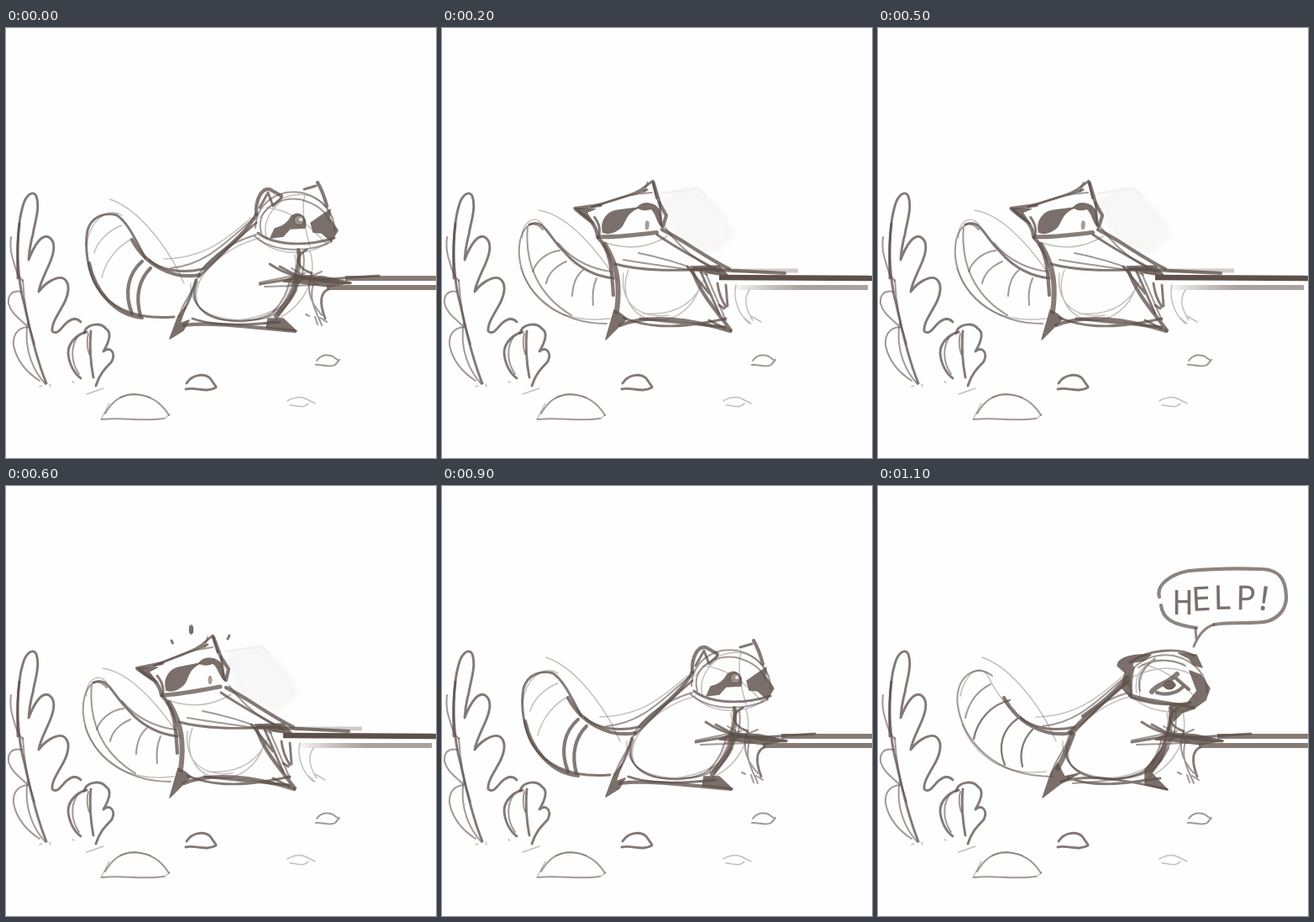
An HTML page for the animation above (2100 ms loop, 512 px wide and 512 px high).

```html
<!DOCTYPE html>
<html lang="en">
<head>
<meta charset="utf-8">
<title>Raccoon tug</title>
<style>
  html, body { margin: 0; width: 100%; height: 100%; overflow: hidden; background: #fefefe; }
  svg { display: block; width: 100vw; height: 100vh; filter: blur(.5px); }
  path, ellipse { fill: none; stroke: #5d504a; stroke-linecap: round; stroke-linejoin: round; }
  .faint { stroke-width: 1.5; opacity: .36; }
  .thin { stroke-width: 2; opacity: .58; }
  .line { stroke-width: 2.9; opacity: .76; }
  .bold { stroke-width: 4.2; opacity: .76; }
  .heavy { stroke-width: 6; opacity: .74; }
  .ink { fill: #5d504a; stroke-width: 1.5; opacity: .82; }
  .rope { stroke: #877b75; stroke-width: 6; stroke-linecap: butt; }
  .ghost { fill: #f9f8f8; stroke: #f2f1f0; stroke-width: 3; }
  text { font: 40px "Noto Sans Mono", monospace; fill: #70645f; }
  .pose { display: none; }
</style>
</head>
<body>
<svg viewBox="0 0 512 512">
  <defs>
    <linearGradient id="fade" gradientUnits="userSpaceOnUse" x1="345" x2="430">
      <stop stop-color="#877b75" stop-opacity="0"/><stop offset="1" stop-color="#a9a19d"/>
    </linearGradient>
    <filter id="soft"><feGaussianBlur stdDeviation="3"/></filter>

    <!-- Parts shared by the two forward-leaning poses -->
    <g id="lean">
      <path class="rope" d="M404 298H512M382 309H512"/>
      <path class="faint" d="M124 204C160 216 196 266 212 304"/>
      <path class="faint" d="M188 275C238 274 264 250 292 226"/>
      <path class="thin" d="M196 286C240 282 264 252 296 226"/>
      <path class="bold" d="M150 252C166 282 198 300 230 294"/>
      <path class="line" d="M170 276C184 288 208 293 234 287"/>
      <path class="line" d="M230 296C254 272 276 250 298 232"/>
      <path class="thin" d="M230 292C222 318 210 326 206 344M298 246C258 258 220 288 224 320C230 350 282 356 312 342C346 324 352 296 350 266"/>
      <path class="thin" d="M228 302C214 338 250 352 292 348C318 346 336 334 346 312"/>
      <path class="faint" d="M302 250C256 262 214 302 230 332C246 358 300 348 322 334M220 304C218 340 256 352 304 346"/>
      <path class="faint" d="M362 266C374 304 346 344 306 352M344 270Q350 300 322 340"/>
      <path class="thin" d="M354 268Q360 300 324 342M338 300Q334 322 318 338"/>
      <path class="line" d="M302 305L350 297L386 300M314 281C330 292 354 302 410 304"/>
      <path class="ink" d="M330 302L346 294L378 296L411 303L384 308L352 304Z"/>
      <path class="line" d="M326 284L352 298L396 300M384 299L444 295"/>
      <path class="thin" d="M302 303L356 292M308 308L368 306M334 308L376 290M340 286L372 306"/>
      <path class="line" d="M358 264C342 272 346 286 364 292"/>
      <path class="bold" d="M348 264Q350 280 344 296"/>
      <path class="thin" d="M364 292C356 314 364 328 376 342M366 304C360 326 370 338 376 354"/>
      <path class="line" d="M384 311C372 316 374 330 380 346"/>
      <path class="thin" d="M368 344l3 9M374 345l8 5M357 341l4 2"/>
    </g>
  </defs>

  <g id="scenery">
    <path class="line" d="M16 233C12 262 14 302 22 330C28 358 36 394 48 423"/>
    <path class="line" d="M14 298C13 268 14 232 20 212C24 198 32 193 36 200C41 214 34 232 32 246Q28 260 27 276C33 260 42 245 51 249C59 254 58 266 52 280C46 294 40 305 39 314C46 304 60 295 68 298C77 303 75 316 69 328C61 343 54 352 55 361C61 366 65 358 71 352Q82 342 89 350"/>
    <path class="thin" d="M6 249Q4 264 9 278Q13 295 20 301M18 314C7 312 2 318 3 328C6 340 15 345 24 354M26 356C13 357 8 366 9 378C13 397 26 411 40 420"/>
    <path class="thin" d="M26 350C20 384 34 410 47 424M20 300Q22 340 34 376"/>
    <path class="line" d="M101 361C99 381 101 400 104 416"/>
    <path class="line" d="M96 362C86 364 74 374 74 387C75 401 82 412 89 417"/>
    <path class="line" d="M93 363C96 352 112 350 119 358C127 363 122 375 116 385C124 379 131 386 126 397C120 404 112 410 107 426"/>
    <path class="thin" d="M85 368C77 380 77 398 87 412M98 364Q95 376 99 388"/>
    <path class="faint" d="M96 436L116 429M79 421l2 1M40 427l3-1M52 424l1 3"/>
    <path class="thin" d="M118 459C126 445 137 436 153 436C171 437 185 446 194 461M114 466C140 463 160 469 188 465"/>
    <path class="faint" d="M113 466L123 447M189 465L195 460M136 440Q153 433 172 440"/>
    <path class="line" d="M215 423C222 412 236 411 243 417L250 427M214 430C226 427 238 435 250 428"/>
    <path class="thin" d="M370 396C375 389 383 388 389 391L396 396M369 401C376 400 386 405 392 401L397 395"/>
    <path class="faint" d="M335 444C342 440 350 439 356 441L368 447M338 449C346 449 354 454 360 447"/>
  </g>

  <g id="cling" class="pose">
    <use href="#lean"/>
    <path class="line" d="M166 274C156 256 146 232 132 223C118 219 102 224 97 241C93 262 98 292 108 308C122 330 148 348 200 344"/>
    <path class="bold" d="M99 280C106 314 130 342 162 345"/>
    <path class="faint" d="M96 260C98 231 120 212 138 223"/>
    <path class="faint" d="M138 235C121 241 108 256 105 268M148 252C130 262 118 280 114 297"/>
    <path class="bold" d="M162 278C146 292 140 314 150 340M172 286C158 300 154 320 160 342"/>
    <path class="bold" d="M298 222C286 244 262 262 236 286"/>
    <path class="ink" d="M214 332L205 343L195 370L211 360L218 348L207 352Z"/>
    <path class="line" d="M226 300Q220 322 212 336"/>
    <path class="bold" d="M212 354C244 350 290 356 344 361"/>
    <path class="line" d="M222 346C250 356 290 354 326 350"/>
    <path class="heavy" d="M346 300C342 318 332 330 322 343"/>
    <path class="ink" d="M312 346L330 346L346 361L310 357Z"/>
    <path class="thin" d="M297 238C298 210 322 191 352 196C378 202 392 222 391 242M304 244C296 216 326 200 350 204Q380 212 386 232"/>
    <path class="faint" d="M302 226C330 188 374 190 388 226M310 214Q346 216 382 258M302 252C322 272 364 272 384 254M328 206Q304 226 310 250M356 198Q350 220 362 260"/>
    <path class="line" d="M300 244C320 260 360 260 391 250"/>
    <path class="thin" d="M296 248C318 268 362 268 388 254"/>
    <path class="bold" d="M298 222C297 203 305 190 314 192L328 200"/>
    <path class="line" d="M302 214L312 196L318 212L328 202"/>
    <path class="bold" d="M371 184Q378 196 382 212"/>
    <path class="line" d="M355 192L369 188"/>
    <path class="ink" d="M315 250L320 239Q334 236 340 224C350 217 359 226 356 238L338 239L330 248Z"/>
    <path class="ink" d="M363 232L373 225L386 216L385 226L395 241L387 254L376 244L366 243Z"/>
    <ellipse cx="349" cy="229" rx="6" ry="6" style="fill:#9b918c"/>
    <ellipse cx="351" cy="228" rx="2" ry="2" style="fill:#eee;stroke:none"/>
  </g>

  <g id="slip" class="pose">
    <path class="rope" d="M374 297H507M370 308H507"/>
    <path class="faint" d="M119 236C102 222 84 246 94 282C104 326 150 350 208 347M92 260C96 240 112 224 124 234M118 214C150 224 182 262 214 312"/>
    <path class="thin" d="M95 284C104 320 140 346 198 346"/>
    <path class="line" d="M130 245C158 286 190 304 222 296"/>
    <path class="thin" d="M124 241C150 254 162 282 190 290M165 293C190 291 202 306 224 300"/>
    <path class="thin" d="M182 279C222 278 242 252 262 226"/>
    <path class="faint" d="M170 276C216 282 240 266 264 240"/>
    <path class="line" d="M270 214C252 244 226 264 220 296"/>
    <path class="thin" d="M262 238C240 266 222 298 212 330M258 236C234 258 214 290 212 318M268 226C244 250 224 274 222 304"/>
    <path class="thin" d="M260 252C228 272 210 316 230 336C250 358 290 348 306 334C326 310 318 280 316 262"/>
    <path class="thin" d="M222 312C224 346 264 352 296 340"/>
    <path class="faint" d="M264 258C224 280 212 324 242 344C278 356 314 332 318 290"/>
    <path class="line" d="M217 306L206 342L197 370L214 354L230 344"/>
    <path class="bold" d="M214 338L199 366"/>
    <path class="thin" d="M207 344L224 350M204 362L226 346"/>
    <path class="line" d="M218 352C252 350 290 344 318 338M222 346C260 364 300 350 316 344"/>
    <path class="thin" d="M236 355C272 360 304 356 340 361L314 341M320 340L340 358"/>
    <path class="bold" d="M328 290C328 310 324 330 314 342"/>
    <path class="thin" d="M336 296Q332 324 308 342M318 266Q322 300 316 338M322 290Q328 318 314 344"/>
    <path class="thin" d="M286 302L316 296L396 303M298 278C320 294 350 300 396 304M308 285L354 294L440 294"/>
    <path class="ink" d="M328 295L354 293L398 303L368 307L344 300Z"/>
    <path class="thin" d="M306 282L346 304M294 304L350 300M322 304L362 290"/>
    <path class="line" d="M318 262C316 280 322 290 326 300"/>
    <path class="thin" d="M342 258C325 272 328 288 346 294M336 260Q320 276 338 292M344 304C348 325 356 334 368 350"/>
    <path class="line" d="M370 310C358 318 360 330 368 347"/>
    <path class="thin" d="M356 341l6 12M366 342l11 7M347 342l5 3"/>
    <path class="thin" d="M265 238C260 210 282 194 308 194C336 194 352 218 354 240M268 244C262 216 286 200 312 200Q338 204 348 226"/>
    <path class="faint" d="M274 214C300 184 338 196 348 226M270 246C300 270 338 270 354 256M296 198Q272 222 282 252M318 200Q306 228 326 264M278 200Q312 214 336 248"/>
    <path class="thin" d="M284 204Q270 226 280 246M276 212L300 226M268 238Q286 228 304 232"/>
    <path class="line" d="M257 248C280 236 312 256 354 254"/>
    <path class="thin" d="M264 248C290 270 326 268 354 260M286 234Q312 216 342 230M292 246L326 238L352 250"/>
    <path class="bold" d="M338 222C350 228 362 238 363 246C361 256 348 258 334 254"/>
    <path class="line" d="M264 222C258 206 264 196 271 197C280 200 274 214 267 224M266 206L278 198"/>
    <path class="thin" d="M314 193L330 189L345 209"/>
    <path class="ink" d="M300 236C300 224 310 219 318 225C326 232 319 240 310 240Z"/>
    <path class="ink" d="M334 224L344 220L356 236L350 242L338 236Z"/>
    <path class="heavy" d="M294 242L308 238"/>
    <ellipse cx="314" cy="229" rx="3" ry="3" style="fill:#aaa19d;stroke:none"/>
  </g>

  <g id="pull" class="pose">
    <path class="ghost" d="M264 206L300 192L332 220L346 246L326 264L286 254Z" filter="url(#soft)"/>
    <path class="ghost" style="fill:none" d="M262 197L304 191L314 200"/>
    <path d="M345 308.9L507 309" style="stroke:url(#fade);stroke-width:6;stroke-linecap:butt"/>
    <path d="M344 289H424" style="stroke:#d0cbc8;stroke-width:5;stroke-linecap:butt"/>
    <path d="M330 297L512 298" style="stroke-width:6.5;stroke-linecap:butt"/>
    <path class="bold" d="M300 287L350 289L408 292"/>
    <path class="faint" d="M115 217C150 222 184 264 208 300M96 250C94 234 108 220 120 234M94 286C110 334 150 352 200 346"/>
    <path class="thin" d="M120 240C104 222 90 244 92 272C96 314 136 352 196 352M102 236C98 280 114 318 154 342"/>
    <path class="line" d="M104 234C122 226 126 248 146 267C162 286 184 296 204 298"/>
    <path class="thin" d="M140 265C124 267 112 278 108 290M148 278C134 284 126 294 124 304M168 288Q156 298 155 319M184 298Q178 312 180 330M138 256C158 280 184 288 202 290"/>
    <path class="bold" d="M186 250C202 266 202 290 204 318"/>
    <path class="heavy" d="M194 258C210 284 212 308 208 338"/>
    <path class="ink" d="M205 336L214 341L220 346L207 359L195 371Z"/>
    <path class="bold" d="M262 240C290 254 312 272 342 287"/>
    <path class="line" d="M256 246C282 264 306 276 330 290M206 281C240 290 280 290 326 286"/>
    <path class="thin" d="M266 238Q288 268 318 284M216 276C250 282 290 286 332 294M234 268Q284 278 316 294"/>
    <path class="faint" d="M190 254Q232 270 268 248M222 288C210 320 228 350 262 348C290 344 304 322 308 304M216 292C212 330 236 346 270 342M240 340Q294 344 312 300"/>
    <path class="bold" d="M212 354C246 340 296 346 343 361"/>
    <path class="line" d="M216 345C252 360 292 356 338 346M236 346Q290 352 338 356"/>
    <path class="bold" d="M298 288C306 314 326 336 344 360"/>
    <path class="line" d="M308 290L330 340M292 284L318 316M318 348L338 358"/>
    <path class="thin" d="M314 292L338 348"/>
    <path class="ink" d="M296 284L330 283L340 294L320 292Z"/>
    <path class="line" d="M328 304Q330 320 338 332M338 306L340 331M330 330l6 4"/>
    <path class="faint" d="M350 306C346 324 354 342 366 352M366 312Q356 326 370 348M360 345l8 7M368 343l12 7"/>
    <g id="head">
      <path class="bold" d="M156 217L186 211M157 218L177 232Q184 240 185 249"/>
      <path class="ink" d="M156 217L180 216L170 221L180 234L164 224Z"/>
      <path class="line" d="M176 214C198 204 218 200 232 190L246 178L252 198M222 196L240 189"/>
      <path class="thin" d="M184 212Q212 196 246 192M240 180L236 194"/>
      <path class="bold" d="M247 180L256 204L265 218L262 231"/>
      <path class="line" d="M180 226Q190 238 186 250M256 203L260 230"/>
      <path class="heavy" style="stroke-width:5" d="M187 249C210 248 232 243 255 239"/>
      <path class="ink" d="M191 243C187 228 196 218 206 216L231 211C214 220 218 230 211 237C203 244 196 245 191 243Z"/>
      <path class="ink" d="M230 211C236 203 250 203 256 212L261 232C253 226 254 215 246 211Q238 215 230 211Z"/>
      <ellipse cx="243" cy="231" rx="2" ry="5" style="fill:#a69d99;stroke:#a69d99"/>
    </g>
    <g id="drops">
      <ellipse class="ink" cx="220.500" cy="171" rx="2" ry="5"/>
      <path class="line" d="M197 184l1.500 3M266 178l-2 4"/>
    </g>
  </g>

  <g id="slump" class="pose">
    <use href="#lean"/>
    <path class="thin" d="M136 226C116 210 90 228 95 262C102 304 138 346 208 346"/>
    <path class="faint" d="M98 250C102 228 120 206 132 228C138 242 146 252 156 264M100 284C118 326 154 346 200 340"/>
    <path class="thin" d="M134 236C118 244 108 258 104 276"/>
    <path class="line" style="stroke-width:2.3" d="M157 255C134 260 118 280 114 301M166 277C148 290 142 310 151 332M184 290C172 302 168 318 172 334"/>
    <path class="bold" d="M228 293C254 272 274 252 296 234M296 228Q274 254 244 274"/>
    <path class="heavy" d="M232 296Q224 318 214 336"/>
    <path class="ink" d="M214 330L206 342L196 371L218 354L240 342L222 346Z"/>
    <path class="line" d="M218 352C250 342 294 350 344 361M226 347C256 360 296 354 336 348"/>
    <path class="thin" d="M232 354C264 352 296 350 324 338"/>
    <path class="ink" d="M344 306L338 326L326 342L345 362L318 356L318 338Z"/>
    <path class="line" d="M348 276Q346 306 326 330"/>
    <path class="line" d="M300 210C322 194 358 192 376 202M304 216C302 226 300 236 302 248"/>
    <path class="thin" d="M298 238C296 212 326 198 352 202C378 208 392 226 392 246M310 216Q336 200 366 214M312 244Q306 222 330 206"/>
    <path class="faint" d="M308 246C302 214 332 200 364 212M314 212Q348 218 380 254M306 254C328 272 360 272 378 262M330 204Q308 222 312 252M302 228Q346 206 380 228"/>
    <path class="bold" d="M300 249C318 256 350 258 376 264"/>
    <path class="line" d="M302 252Q338 264 372 258"/>
    <path class="ink" d="M285 214C286 205 300 200 325 201L316 208L304 210L300 222L301 252L290 240L294 222Z"/>
    <path class="ink" d="M358 199L379 201L386 216L376 213L370 205Z"/>
    <path class="ink" d="M371 220L384 225L395 241L390 255L376 265L362 270L352 280L348 262L368 259L380 244Z"/>
    <path class="heavy" d="M326 245C332 236 344 236 356 224"/>
    <path class="bold" d="M332 246C344 250 358 246 364 238M356 230L370 242"/>
    <ellipse cx="347" cy="237" rx="7" ry="5" style="fill:#71655f"/>
  </g>

  <g id="bubble" class="pose" opacity=".92">
    <path class="bold" d="M337 142C339 158 350 165 379 169M400 165C422 161 448 165 464 161C480 156 487 143 486 130C485 110 477 100 458 99C430 98 392 99 370 101C348 105 331 118 335 132"/>
    <path class="line" d="M378 169L379 182M376 191C382 176 390 168 400 165"/>
    <text x="351 374 399 426 446" y="153 149 147 147 146" rotate="0 -3 -1 1 8">HELP!</text>
  </g>
</svg>
<script>
  const LOOP = 2100;
  // Start time in ms, then the groups visible from that moment.
  const schedule = [
    [0, 'cling'],
    [100, 'slip'],
    [200, 'pull'],
    [300, 'pull', 'drops'],
    [500, 'pull'],
    [600, 'pull', 'drops'],
    [800, 'slip'],
    [900, 'cling'],
    [1000, 'slump'],
    [1100, 'slump', 'bubble'],
  ];
  const get = id => document.getElementById(id);
  const parts = ['cling', 'slip', 'pull', 'drops', 'slump', 'bubble'].map(get);
  const head = get('head');

  function draw(now) {
    const time = now % LOOP;
    const [, ...visible] = schedule.findLast(([start]) => start <= time);
    for (const part of parts) {
      part.style.display = visible.includes(part.id) ? 'inline' : 'none';
    }
    // The head tips forward between the two tugs.
    head.setAttribute('transform', visible.includes('drops') ? '' : 'rotate(4 190 250)');
    requestAnimationFrame(draw);
  }
  draw(performance.now());
</script>
</body>
</html>
```
